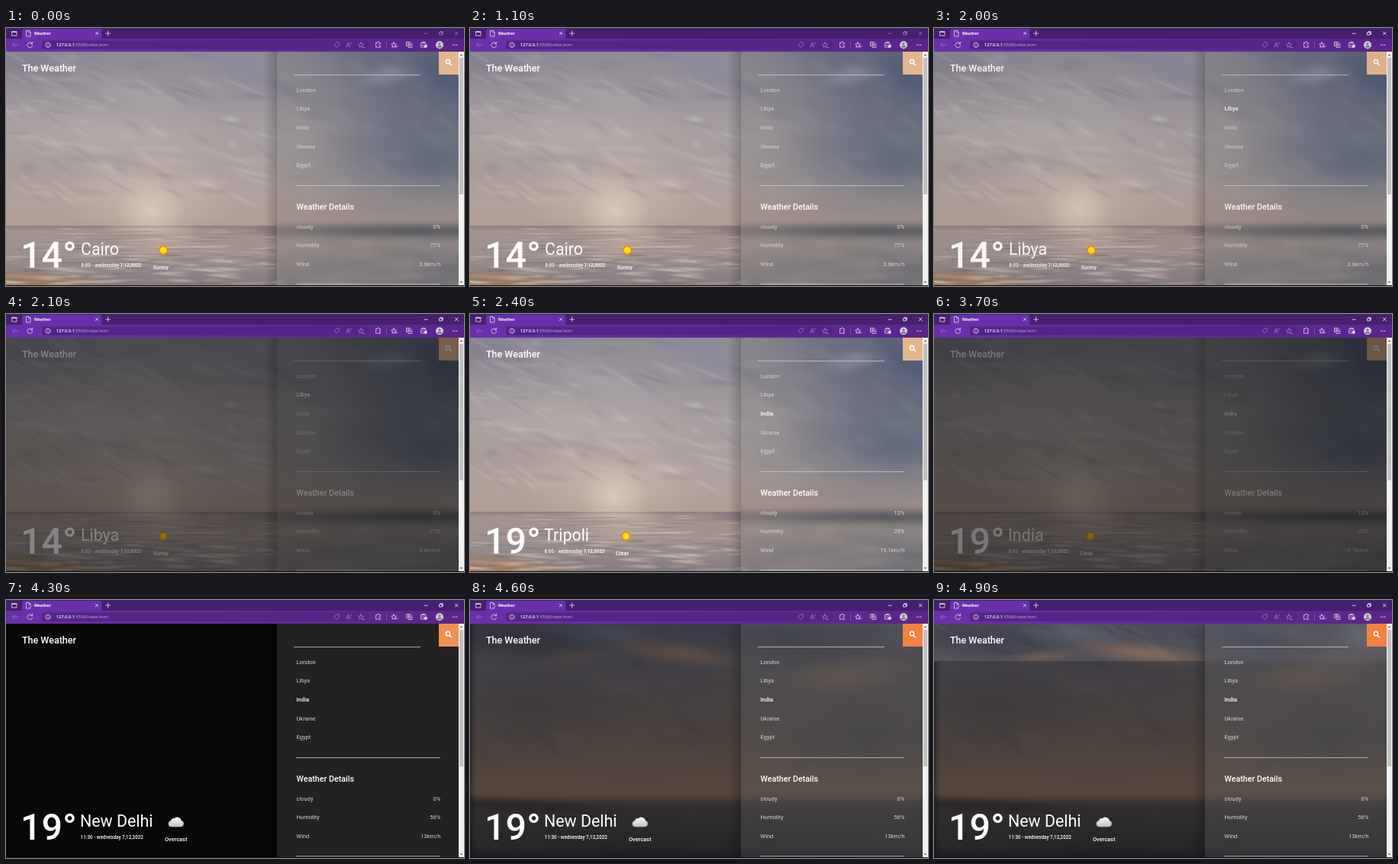
An HTML page with a canvas that plays this animation: 600 by 338 pixels, repeating every 5 s.

```html
<!DOCTYPE html>
<html lang="en">
<head>
<meta charset="utf-8">
<title>Weather</title>
<style>
  html, body { margin: 0; width: 100%; height: 100%; overflow: hidden; background: #080808; }
  #stage { position: relative; width: 600px; height: 338px; overflow: hidden; background: #080808; }
  #app, #app canvas, svg.layer { position: absolute; left: 0; top: 0; width: 600px; height: 338px; }
  text { font-family: Roboto, "Open Sans", sans-serif; fill: #fff; }
  .item { font-size: 7.5px; fill: #d8d5d5; }
  .item.on { fill: #fff; font-weight: 500; }
  .end { text-anchor: end; }
  .mid { font-weight: 500; }
  .bar text { font-family: "Open Sans", "Noto Sans", sans-serif; }
  .ico { fill: none; stroke: #e6dcf1; stroke-width: .8; stroke-linecap: round; stroke-linejoin: round; }
  .rule { stroke: #d0cdcd; stroke-width: .8; }
</style>
</head>
<body>
<div id="stage">
  <div id="app">
    <canvas id="bg" width="600" height="338"></canvas>
    <svg class="layer" viewBox="0 0 600 338">
      <defs>
        <linearGradient id="puff" x1="0" y1="0" x2="0" y2="1">
          <stop offset="0" stop-color="#fff"/><stop offset="1" stop-color="#b9bcc2"/>
        </linearGradient>
      </defs>
      <text class="mid" x="21" y="56.8" font-size="12.5">The Weather</text>
      <text class="mid" id="temp" x="19" y="314" font-size="48.5"></text>
      <text id="city" y="296.8" font-size="21.4"></text>
      <text class="mid" id="date" y="313.2" font-size="6.3"></text>
      <text class="mid" id="cond" y="316.2" font-size="7.4"></text>
      <g id="sun">
        <path id="rays" fill="#f08c12"/>
        <circle r="4.3" fill="#ffe01a"/>
      </g>
      <path id="cloud" fill="url(#puff)" d="M-6 6.2a4 4 0 0 1-.6-7.9a4.6 4.6 0 0 1 5-3.2a5.4 5.4 0 0 1 9 3a4.2 4.2 0 0 1-.6 8.1z"/>
      <path class="rule" d="M377 61.6H543M380 206.6H569M380 335.6H569"/>
      <rect id="btn" x="567" y="31" width="26" height="30"/>
      <g fill="none" stroke="#fff" stroke-width="1.5" stroke-linecap="round">
        <circle cx="579" cy="44.2" r="2.6"/><path d="M581.1 46.3l2.4 2.4"/>
      </g>
      <g id="list"></g>
      <text class="mid" x="380.5" y="237.8" font-size="10.7">Weather Details</text>
    </svg>
  </div>
  <svg class="layer bar" viewBox="0 0 600 338">
    <defs>
      <linearGradient id="tool">
        <stop offset="0" stop-color="#6a30ac"/><stop offset="1" stop-color="#582689"/>
      </linearGradient>
    </defs>
    <rect width="600" height="15" fill="#45206d"/>
    <rect y="14" width="600" height="17" fill="url(#tool)"/>
    <path d="M21 14.5V3q0-2 2-2H123.5q2 0 2 2V14.500z" fill="#6a30ac"/>
    <rect x="47" y="16.5" width="428" height="11.5" rx="2.5" fill="#532587"/>
    <text x="37" y="8.8" font-size="5.1" font-weight="700">Weather</text>
    <text x="66" y="24.3" font-size="5.6"><tspan font-weight="600">127.0.0.1</tspan><tspan fill="#c9b7df">:5500/index.html</tspan></text>
    <g class="ico">
      <path d="M8 4.5h6v5.5h-6zM8 5.5h6"/>
      <path d="M27 3.5h3l2 2v5.5h-5zM30 3.5v2h2"/>
      <path d="M117.3 5.3l3.4 3.4m0-3.4l-3.4 3.4M130.5 7h6M133.5 4v6"/>
      <path d="M15.5 22.2h-7l3-3m-3 3l3 3" stroke="#9a78c4"/>
      <path d="M34.3 20.5a3.4 3.4 0 1 0 .4 2.5M34.6 18.3v2.4h-2.4"/>
      <circle cx="55" cy="22.2" r="3.2"/><path d="M55 22v2M55 20.500v.1"/>
      <g stroke="#a183c4">
        <path d="M430 22l3.5-3.2 3 .3.2 2.900-3.300 3.300z"/>
        <path d="M446 25l2.2-6 2.2 6m-3.600-2h2.800M451.500 18.800q1.500 1 .2 2.600"/>
        <path d="M465 18.700l1 2.300 2.400.2-1.700 1.600.5 2.500-2.200-1.300-2.200 1.300.5-2.500-1.700-1.600 2.400-.2zM467 25.500h3"/>
      </g>
      <path d="M485 19.500h1.500q0-1.500 1.300-1.500t1.300 1.500h1.300v1.700q-1.300 0-1.300 1.200t1.300 1.200v1.600h-5.400z"/>
      <path d="M498.500 18v8.500" stroke="#8055ad"/>
      <path d="M508 18.700l1 2.300 2.400.2-1.700 1.600.5 2.500-2.200-1.300-2.200 1.300.5-2.500-1.700-1.600 2.400-.2zM510 24h3"/>
      <path d="M525 18.500h4.500v5h-4.500zM527 25.500h4.700v-5M527.200 19.700v2.600m-1.300-1.300h2.600"/>
      <path d="M544 19.500h6v5.500h-6zM545.500 19.500v-1.300h3v1.300M545 22.200h2"/>
      <path d="M548.500 22.500h2.700v2.700h-2.700z" fill="#e6dcf1"/>
    </g>
    <circle cx="568" cy="22.300" r="5" fill="#d5d0da"/>
    <circle cx="568" cy="20.900" r="1.700" fill="#77717f"/>
    <path d="M564.800 25.600a3.200 2.700 0 0 1 6.400 0z" fill="#77717f"/>
    <g fill="#fff"><circle cx="585.500" cy="22.300" r=".7"/><circle cx="588" cy="22.300" r=".7"/><circle cx="590.500" cy="22.300" r=".7"/></g>
    <path id="win" class="ico" d="M548 7.200h4M568 5.700h3.300v3.300h-3.300zM569 5.700v-1h3.300v3.300h-1M588.200 5l4 4m0-4l-4 4"/>
    <rect x="593" y="31" width="7" height="307" fill="#f1f1f1"/>
    <rect x="594" y="39" width="5" height="179" fill="#c1c1c1"/>
    <path d="M594.800 36.200l1.700-2.200 1.700 2.200zM594.800 332l1.700 2.200 1.700-2.200z" fill="#555"/>
    <rect y="337" width="600" height="1" fill="#101014"/>
  </svg>
</div>
<script>
const W = 600, H = 338, LOOP = 5000, STEP = 100;
const $ = id => document.getElementById(id);
const cities = ['London', 'Libya', 'India', 'Ukraine', 'Egypt'];
const labels = ['cloudy', 'Humidity', 'Wind'];

// Each row: start time, then the state that holds from there.
const sunny = { temp: '14°', x: 98, date: '8:00 - wednesday 7,12,2022', cond: 'Sunny', cx: 192.6, ix: 206, values: ['0%', '77%', '3.6km/h'], btn: '#e3b78d' };
const clear = { ...sunny, temp: '19°', x: 97, cond: 'Clear', cx: 190.8, ix: 204.5, values: ['12%', '35%', '19.1km/h'] };
const cloudy = { ...clear, date: '11:30 - wednesday 7,12,2022', cond: 'Overcast', cx: 208, ix: 222.5, values: ['0%', '56%', '13km/h'], cloud: true, btn: '#f09150' };
const states = [
  [0, { ...sunny, city: 'Cairo' }],
  [2000, { ...sunny, city: 'Libya' }],
  [2200, { ...clear, city: 'Tripoli' }],
  [3600, { ...clear, city: 'India' }],
  [4200, { ...cloudy, city: 'New Delhi' }],
  [4600, { ...cloudy, city: 'New Delhi', btn: '#f5823f' }]
];
const hover = [[0, -1], [1200, 2], [1400, 1], [2400, 2]];
const fade = [[0, 1], [2000, .97], [2100, .5], [2200, .35], [2300, .9], [2400, 1],
  [3600, .95], [3700, .45], [3800, 0], [4200, .6], [4300, 1]];
const backdrop = [[0, 'beach'], [4200, 'none'], [4600, 31], [4700, 46], [4800, 63], [4900, 80]];
const focusAt = 1800;

const pick = (table, t) => table.reduce((v, row) => row[0] <= t ? row[1] : v, table[0][1]);

function seeded(n) {
  return () => (n = (n * 16807) % 2147483647) / 2147483647;
}

function sheet() {
  const cv = document.createElement('canvas');
  cv.width = W;
  cv.height = H;
  return cv.getContext('2d');
}

function ramp(c, y0, y1, stops) {
  const g = c.createLinearGradient(0, y0, 0, y1);
  stops.forEach(([at, color]) => g.addColorStop(at, color));
  c.fillStyle = g;
  c.fillRect(0, y0, W, y1 - y0);
}

// Soft ellipse; color is #rrggbbaa.
function blob(c, x, y, rx, ry, turn, color) {
  c.save();
  c.translate(x, y);
  c.rotate(turn);
  c.scale(rx, ry);
  const g = c.createRadialGradient(0, 0, 0, 0, 0, 1);
  g.addColorStop(0, color);
  g.addColorStop(1, color.slice(0, 7) + '00');
  c.fillStyle = g;
  c.fillRect(-1, -1, 2, 2);
  c.restore();
}

function clouds(c, seed, count, top, bottom, colors) {
  const rnd = seeded(seed);
  for (let i = 0; i < count; i++) {
    const x = rnd() * W, y = top + rnd() * (bottom - top);
    const turn = .35 + (rnd() - .5) * .7;
    blob(c, x, y, 12 + rnd() * 34, 2.5 + rnd() * 5, turn, colors[i % colors.length]);
  }
}

function waves(c, seed, count, top, bottom, colors) {
  const rnd = seeded(seed);
  for (let i = 0; i < count; i++) {
    const depth = rnd();
    blob(c, rnd() * W, top + depth * (bottom - top), 10 + rnd() * 35, .8 + depth * 2.2,
      (rnd() - .4) * .25 * depth, colors[i % colors.length]);
  }
}

function drawBeach() {
  const c = sheet();
  ramp(c, 0, 259, [[0, '#8a8590'], [.3, '#98929a'], [.55, '#a9a09f'], [.8, '#b2a49f'], [1, '#b29d93']]);
  [
    [20, 48, 150, 40, .1, '#7c778588'],
    [170, 85, 130, 26, .35, '#b3acb077'],
    [150, 140, 160, 45, .1, '#b9b0aeaa'],
    [320, 60, 90, 30, .35, '#8583998a'],
    [330, 175, 120, 60, 0, '#a09ba077'],
    [20, 190, 100, 40, 0, '#9c908f77'],
    [590, 60, 225, 150, 0, '#38496edd'],
    [560, 175, 190, 80, 0, '#4d5d7ecc'],
    [500, 62, 50, 14, -.15, '#a0a6b4bb'],
    [395, 60, 60, 40, .2, '#94929c77'],
    [430, 125, 70, 14, .3, '#8a8a9866'],
    [520, 238, 150, 26, 0, '#9d8d8fbb'],
    [188, 225, 120, 60, 0, '#d5c5b588'],
    [190, 240, 46, 40, 0, '#e8d8c499']
  ].forEach(b => blob(c, ...b));
  clouds(c, 41, 170, 32, 225, ['#ffffff1e', '#55506a20', '#e0d6d024']);

  ramp(c, 259, H, [[0, '#8c7f80'], [.08, '#a3938d'], [.4, '#a0928e'], [.7, '#93888a'], [1, '#877b7c']]);
  [
    [540, 266, 260, 12, 0, '#30394aee'],
    [560, 315, 200, 45, 0, '#5b5f6caa'],
    [530, 308, 50, 9, .1, '#a0948d99'],
    [440, 325, 60, 9, .1, '#9a8c8499'],
    [190, 264, 70, 9, 0, '#dcc6b2bb'],
    [200, 285, 60, 30, 0, '#c4b0a288'],
    [0, 338, 130, 26, 0, '#a07a55ff'],
    [60, 334, 110, 14, .1, '#a07c5add']
  ].forEach(b => blob(c, ...b));
  waves(c, 77, 240, 263, 336, ['#e8dcd566', '#625a6250', '#cfc0b24c']);
  return c.canvas;
}

function drawDusk() {
  const c = sheet();
  ramp(c, 0, 260, [[0, '#464955'], [.3, '#54525a'], [.7, '#62554f'], [1, '#74604f']]);
  [
    [60, 50, 140, 30, .1, '#393b46bb'],
    [180, 42, 80, 18, .1, '#646a7899'],
    [275, 70, 100, 16, .12, '#9a7055bb'],
    [140, 74, 60, 9, -.1, '#80645599'],
    [430, 58, 90, 35, .2, '#3d4250cc'],
    [575, 45, 60, 26, 0, '#6d7788bb'],
    [500, 98, 120, 26, -.1, '#8d715fbb'],
    [90, 140, 150, 50, 0, '#47454b99'],
    [220, 195, 170, 50, 0, '#6b574d88'],
    [520, 180, 150, 55, 0, '#43434bbb']
  ].forEach(b => blob(c, ...b));
  clouds(c, 19, 100, 32, 200, ['#a5806a22', '#22243030', '#8890a01c']);
  ramp(c, 260, H, [[0, '#4b423f'], [.25, '#3c3838'], [1, '#2b2a2e']]);
  blob(c, 60, 268, 190, 8, .05, '#201d1ecc');
  waves(c, 63, 80, 268, 332, ['#6f625a30', '#15141840']);
  return c.canvas;
}

const beach = drawBeach(), dusk = drawDusk();
const page = sheet(), bg = $('bg').getContext('2d');
let shown = null;

function paint(kind) {
  if (kind === shown) return;
  shown = kind;
  page.fillStyle = '#080808';
  page.fillRect(0, 0, W, H);
  if (kind === 'beach') page.drawImage(beach, 0, 0);
  else if (kind !== 'none') {
    // Coarse pass everywhere, fine pass above the edge.
    page.filter = 'blur(5px)';
    page.drawImage(dusk, 0, 0);
    page.filter = 'none';
    page.fillStyle = 'rgba(18,18,22,.3)';
    page.fillRect(0, 0, W, H);
    page.drawImage(dusk, 0, 0, W, kind, 0, 0, W, kind);
  }
  bg.drawImage(page.canvas, 0, 0);
  const g = bg.createLinearGradient(338, 0, 355, 0);
  g.addColorStop(0, 'rgba(0,0,0,0)');
  g.addColorStop(1, 'rgba(0,0,0,.2)');
  bg.fillStyle = g;
  bg.fillRect(338, 30, 17, 308);
  bg.save();
  bg.beginPath();
  bg.rect(355, 30, 238, 308);
  bg.clip();
  bg.filter = 'blur(4px)';
  bg.drawImage(page.canvas, 0, 0);
  bg.filter = 'none';
  bg.fillStyle = 'rgba(110,110,110,.26)';
  bg.fillRect(355, 30, 238, 308);
  bg.restore();
}

function label(x, y, str, cls) {
  const el = document.createElementNS('http://www.w3.org/2000/svg', 'text');
  el.setAttribute('x', x);
  el.setAttribute('y', y);
  el.setAttribute('class', cls);
  el.textContent = str;
  $('list').append(el);
  return el;
}

const GAP = 24.65;
const links = cities.map((s, i) => label(380.5, 83.8 + GAP * i, s, 'item'));
labels.forEach((s, i) => label(380.5, 262.6 + GAP * i, s, 'item'));
const values = labels.map((s, i) => label(569.3, 262.6 + GAP * i, '', 'item end'));

$('rays').setAttribute('d', 'M' + Array.from({ length: 16 }, (_, i) => {
  const r = i % 2 ? 5.2 : 7.2, a = (i + 1) * Math.PI / 8;
  return (r * Math.cos(a)).toFixed(2) + ' ' + (r * Math.sin(a)).toFixed(2);
}).join('L') + 'z');

function put(id, str, x) {
  $(id).textContent = str;
  if (x !== undefined) $(id).setAttribute('x', x);
}

function render(t) {
  const s = pick(states, t), on = pick(hover, t);
  paint(pick(backdrop, t));
  $('app').style.opacity = pick(fade, t);
  put('temp', s.temp);
  put('city', s.city, s.x);
  put('date', s.date, s.x + .6);
  put('cond', s.cond, s.cx);
  values.forEach((el, i) => el.textContent = s.values[i]);
  links.forEach((el, i) => el.classList.toggle('on', i === on));
  $('btn').setAttribute('fill', s.btn);
  for (const id of ['sun', 'cloud']) {
    $(id).setAttribute('transform', `translate(${s.ix} 291)`);
    $(id).style.display = (id === 'cloud') === !!s.cloud ? '' : 'none';
  }
  $('win').style.stroke = t < focusAt ? '#a08cb8' : '#fff';
}

const start = performance.now();
let last = -1;
function tick() {
  const t = Math.floor((performance.now() - start) % LOOP / STEP) * STEP;
  if (t !== last) render(last = t);
  requestAnimationFrame(tick);
}
tick();
</script>
</body>
</html>
```
